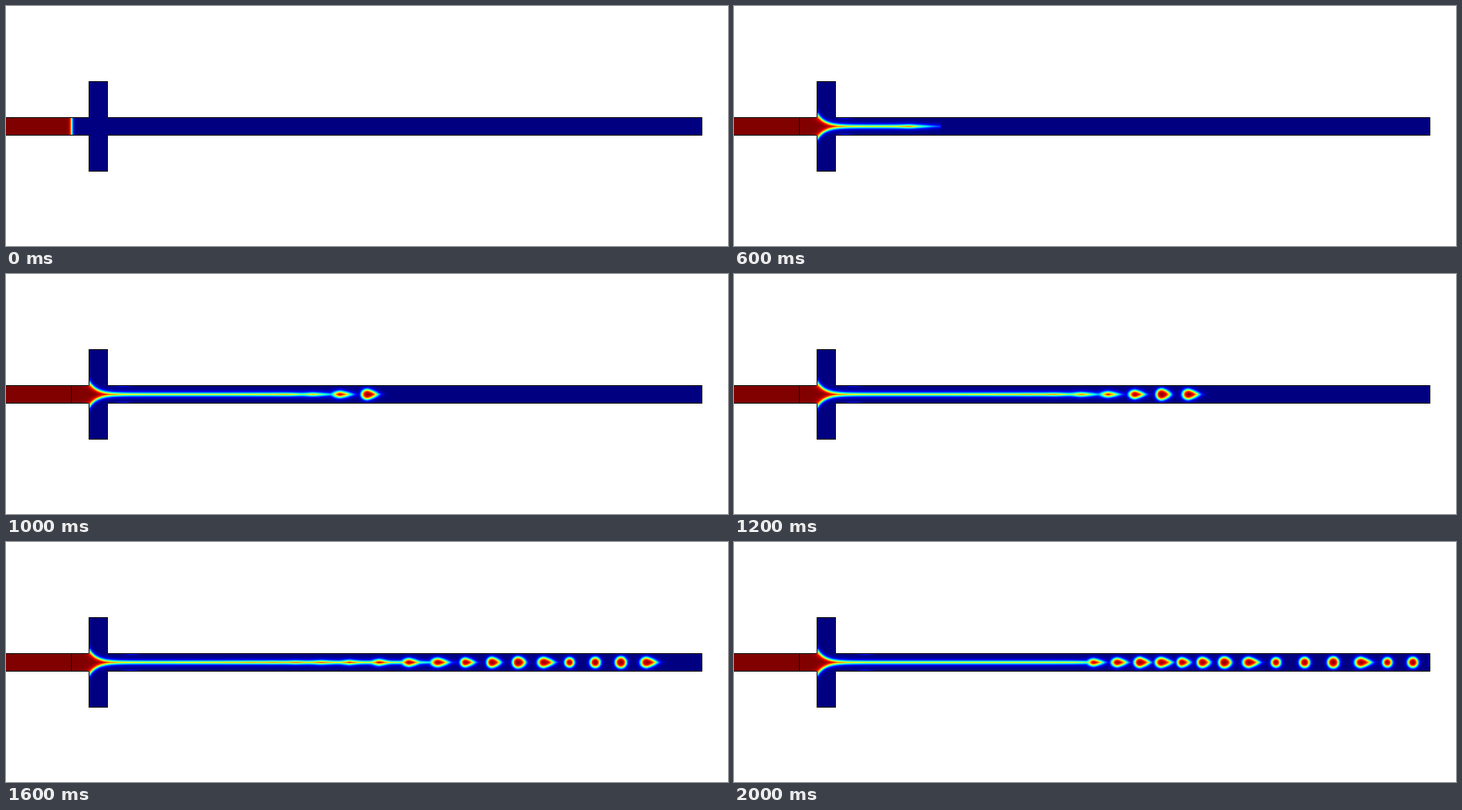
An HTML page with a canvas for the animation above (2100 ms loop, 900 px wide and 300 px high).

```html
<!DOCTYPE html>
<html lang="en">
<head>
<meta charset="utf-8">
<title>Flow focusing droplets</title>
<style>
html, body { margin: 0; width: 900px; height: 300px; overflow: hidden; background: #fff; }
canvas { display: block; }
</style>
</head>
<body>
<canvas id="stage" width="900" height="300"></canvas>
<script>
const STEP = 100, STEPS = 21, DROPS = 20;
const TOP = 94, ROWS = 113, WIDTH = 868, MID = 150;
const ctx = document.getElementById('stage').getContext('2d');
const img = ctx.createImageData(WIDTH, ROWS);

// End of the unbroken jet: [ms, x, softness]
const jetKeys = [
  [0, 81.5, 2.3], [400, 140, 12], [800, 317, 3],
  [1600, 535, 36], [1800, 462, 36], [2000, 452, 16]
];

const clamp = v => Math.max(0, Math.min(1, v));
const mix = (a, b, k) => a + (b - a) * k;
const smooth = v => { v = clamp(v); return v * v * (3 - 2 * v); };
const edge = d => 0.5 * (1 - Math.tanh(d));
const bell = v => Math.exp(-v * v);

function jetAt(t) {
  const i = Math.max(1, jetKeys.findIndex(k => k[0] >= t));
  const [t0, x0, s0] = jetKeys[i - 1], [t1, x1, s1] = jetKeys[i];
  const k = (t - t0) / (t1 - t0);
  return { x: mix(x0, x1, k), soft: mix(s0, s1, k), bend: t ? 0.05 : 0 };
}

// Evenly spaced swellings ride the jet, pinch off as pointed drops, then round up.
// Every fourth drop is a merged pair and keeps its point.
function dropAt(i, t) {
  const pinch = 720 + 280 * Math.sqrt(i);
  const merged = i % 4 === 0;
  const r = 5.9 + 0.6 * Math.sin(i * Math.PI / 2);
  const speed = 58 + 0.35 * i;
  const grow = smooth((t - pinch) / 400 + 0.5);
  const round = merged ? 0 : smooth((t - pinch - 120) / 250);
  return {
    x: 798 - 32 * i - 22 * bell((i - 12.5) / 3.5) + speed * (t - 1600) / STEP,
    amp: smooth((t - pinch + 500) / 350),
    left: mix(9, r, grow) + (merged ? 1 : 0),
    right: r + mix(5, merged ? 1 : 0, merged ? 0 : round) + (merged ? 1 : 0),
    high: mix(0.4, r, grow),
    powL: mix(1.3, 2, grow),
    powR: mix(1.3, 2, round)
  };
}

function dropValue(d, x, y) {
  const dx = x - d.x;
  const p = dx > 0 ? d.powR : d.powL;
  const u = Math.abs(dx) / (dx > 0 ? d.right : d.left);
  const f = Math.pow(Math.pow(u, p) + Math.pow(y / d.high, p), 1 / p);
  return d.amp * edge((f - 1) * d.high / 2.9);
}

// A funnel at the cross that narrows to a thread, cut off at the jet's end
function jetValue(jet, x, y) {
  const tip = edge((x - jet.x + jet.bend * y * y) / jet.soft);
  if (!jet.bend) return tip;
  const half = 13.5 * Math.exp((104 - x) / 10);
  const d = (y - half - 0.65) / Math.hypot(1, half / 10);
  return edge(d / 2.9) * tip;
}

const inside = (x, y) => x < WIDTH &&
  ((y >= 139 && y <= 161) || (x >= 103 && x <= 126 && y >= 94 && y <= 206));
const border = (x, y) => !(inside(x - 1, y) && inside(x + 1, y) &&
  inside(x, y - 1) && inside(x, y + 1));

// Rainbow scale from dark blue to dark red
const ramp = (v, c) => 255 * clamp(1.5 - Math.abs(4 * v - c));

function put(x, y, color) {
  img.data.set([...color, 255], ((y - TOP) * WIDTH + x) * 4);
}

function render(t) {
  const jet = jetAt(t);
  const drops = Array.from({ length: DROPS }, (_, i) => dropAt(i, t))
    .filter(d => d.amp > 0);
  const streak = 134 + (t - 400) * 0.018;

  for (let x = 0; x < WIDTH; x++) {
    const near = drops.filter(d => Math.abs(d.x - x) < 40);
    for (let y = TOP; y < TOP + ROWS; y++) {
      if (!inside(x, y)) continue;
      if (border(x, y) || (t && x === 81)) {
        put(x, y, [0, 0, 0]);
        continue;
      }
      const h = Math.abs(y - MID);
      let v = jetValue(jet, x, h);
      if (h <= 11 && x > 126) {
        const sum = near.reduce((s, d) => s + dropValue(d, x, h) ** 4, v ** 4);
        v = Math.min(1, sum ** 0.25);
        if (t >= 300) v += 0.12 * bell((x - streak) / 9) * bell(h - 10);
      }
      put(x, y, [ramp(v, 3), ramp(v, 2), ramp(v, 1)]);
    }
  }
  ctx.putImageData(img, 0, TOP);
}

const start = performance.now();
let shown = -1;
function tick() {
  const n = Math.floor((performance.now() - start) / STEP) % STEPS;
  if (n !== shown) {
    shown = n;
    render(n * STEP);
  }
  requestAnimationFrame(tick);
}
tick();
</script>
</body>
</html>
```
